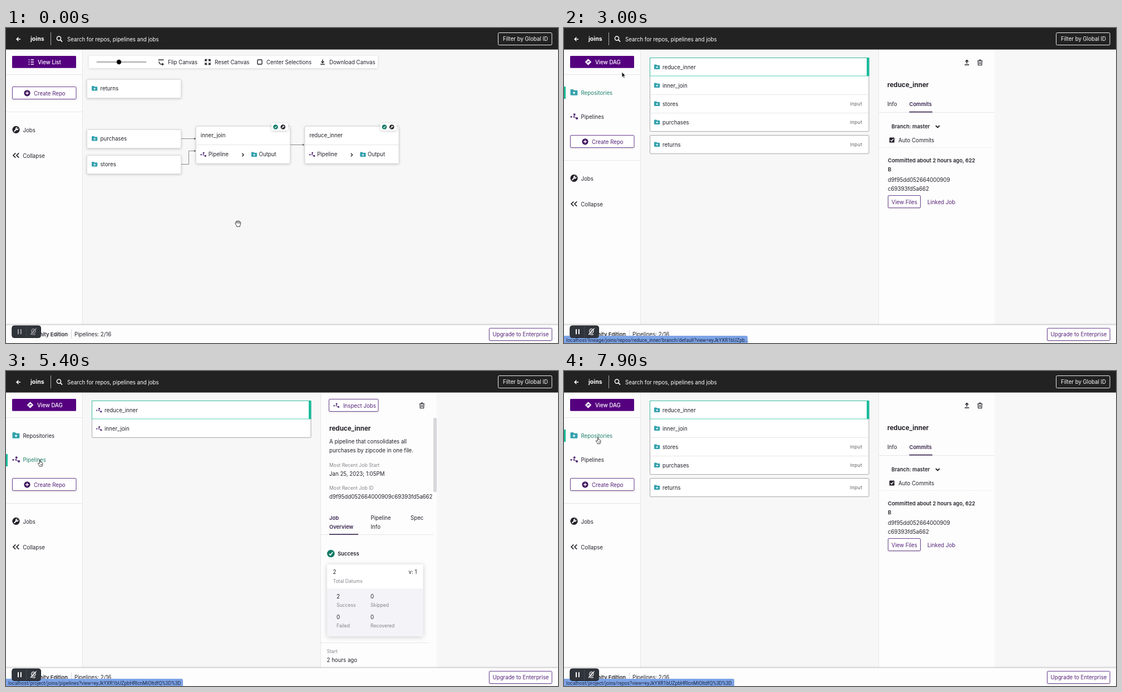
Recreate the animation shown at these times as an HTML page. Size 992 by 565 pixels, loop 8 s.

```html
<!DOCTYPE html>
<html lang="en">
<head>
<meta charset="utf-8">
<title>Joins project</title>
<style>
html, body { margin: 0; width: 100%; height: 100%; overflow: hidden; background: #f7f7f7; }
svg { display: block; width: 992px; height: 565px; }
text { font: 400 9.7px Inter, sans-serif; fill: #25212a; white-space: pre; }
.b { font-weight: 600; font-size: 9.4px; }
.h { font-weight: 700; font-size: 11.6px; }
.m { font-weight: 500; }
.w { fill: #fff; }
.p { fill: #552478; }
.g { fill: #85828a; font-size: 8.6px; }
.in { fill: #55525a; font-size: 8.2px; letter-spacing: .5px; }
.on { fill: #23806d; }
.tab { fill: #35204a; }
.url { font: 8.75px Roboto, sans-serif; fill: #1b2740; }
.btn { fill: #fff; stroke: #6c4390; filter: drop-shadow(0 1px 1.5px #0002); }
.card { fill: #fff; filter: drop-shadow(0 1px 2px #0003); }
.box { fill: #fff; stroke: #a9a8ad; }
.rule { stroke: #e6e5e9; fill: none; }
.ln { fill: none; stroke: #25212a; stroke-width: 1.4; }
.edge { fill: none; stroke: #8a878e; }
</style>
</head>
<body>
<svg id="stage" viewBox="0 0 992 565"></svg>
<script>
const PURPLE = '#55017f', TEAL = '#1abc9c', INK = '#25212a';

// Text is placed by its vertical centre.
const text = (x, y, s, c = '', more = '') => `<text x="${x}" y="${y + 3.5}" class="${c}" ${more}>${s}</text>`;
const rect = (x, y, w, h, more = '') => `<rect x="${x}" y="${y}" width="${w}" height="${h}" ${more}/>`;
const path = (d, more = 'class="ln"') => `<path d="${d}" ${more}/>`;
const dot = (x, y, r, fill = INK) => `<circle cx="${x}" cy="${y}" r="${r}" fill="${fill}"/>`;
const at = (x, y, s, k = 1) => `<g transform="translate(${x} ${y}) scale(${k})">${s}</g>`;
const group = (id, s) => `<g id="${id}">${s}</g>`;
const rule = d => path(d, 'class="rule"');
const button = (x, y, w) => rect(x, y, w, 22, 'rx="1.5" class="btn"');

const folder = (x, y, k = 1) => at(x, y,
  path('M0 1Q0 0 1 0H4L5.2 1.3H9.3Q10.3 1.3 10.3 2.3V7.6Q10.3 8.6 9.3 8.6H1Q0 8.6 0 7.6Z', 'fill="#35a2ae"') +
  path('M3.5 5H6.9M5.2 3.3V6.7', 'stroke="#fff" stroke-width="1.1"'), k);
const nodes = (x, y, k = 1) => at(x, y,
  path('M5.6 2.2L4.8 5.2L8.8 7.4', 'fill="none" stroke="#512a75" stroke-width=".8"') +
  dot(1.2, 5.2, 1.2, '#512a75') + dot(5.6, 2, 1.5, '#512a75') +
  dot(4.8, 5.4, .9, '#512a75') + dot(8.9, 7.4, 1.6, '#512a75'), k);
const wrench = (x, y, r) => at(x, y, dot(0, 0, 6.5) +
  path('M-2.8 2.8L1 -1', 'stroke="#fff" stroke-width="2" stroke-linecap="round"') +
  dot(1.6, -1.6, 2.6, '#fff') + path('M1.6 -1.6L4.4 -4.4', `stroke="${INK}" stroke-width="1.9"`), r / 6.5);
const check = (x, y, r) => at(x, y, dot(0, 0, 6.5, '#127a66') +
  path('M-2.8 .4L-.8 2.6L3 -2.4', 'fill="none" stroke="#fff" stroke-width="1.6"'), r / 6.5);
const trash = at(747.5, 62,
  path('M-4.6 -3H4.6M-1.6 -3V-4.6H1.6V-3M-3.6 -3L-3.2 4.7H3.2L3.6 -3M-1.2 -1V3M1.2 -1V3', 'class="ln" style="stroke-width:1.1"'));

const repoCard = (y, name, id = '') =>
  rect(145.5, y + .5, 169, 33, `rx="1.5" class="card" stroke="#dddce0" ${id}`) +
  folder(154, y + 12) + text(169.5, y + 16, name);

const pipeCard = (x, name) =>
  rect(x, 176.5, 169, 66.5, 'rx="1.5" class="card" stroke="#dddce0"') + rule(`M${x} 209.5h169`) +
  text(x + 8.2, 192, name) + nodes(x + 8, 222) + text(x + 22.2, 226.5, 'Pipeline') +
  path(`M${x + 82.8} 224.7l2.8 2.8l-2.8 2.8`) + folder(x + 99.3, 222.5) + text(x + 113, 226.5, 'Output') +
  rect(x + 135.5, 171, 30, 13, 'rx="2" class="card"') + check(x + 143, 177.5, 4.3) + wrench(x + 156.3, 177.5, 4.3);

const row = (y, name, icon, input) => icon(162, y - 4.6) + text(177, y, name) +
  (input ? text(514, y - .5, 'Input', 'in') : '');
const selected = rect(154.5, 53.5, 393, 32.5, `fill="none" stroke="${TEAL}" stroke-opacity=".75"`) +
  rect(544, 53, 4.5, 33, `fill="${TEAL}"`);
const panel = rect(566, 39, 208, 493, 'fill="#fdfdfd"') + rule('M565.5 39V532') + trash;

const sidebar = rect(0, 38, 137, 494, 'fill="#fdfdfd"') + rule('M137.5 39V532M0 83.5H137');
const lower = group('lower',
  button(11.5, 105.5, 114.5) + dot(38, 116.8, 5.6, '#42175f') +
  path('M35 116.8H41M38 113.8V119.8', 'stroke="#fff" stroke-width="1.4"') + text(50, 117, 'Create Repo', 'p') +
  rule('M0 150.5H137') + wrench(18, 182.3, 6.6) + text(30.5, 183, 'Jobs') +
  path('M17.2 224.3L13 228.5L17.2 232.7M23.2 224.3L19 228.5L23.2 232.7', 'class="ln" style="stroke-width:1.7"') +
  text(30.2, 229, 'Collapse'));

const dag = group('dag',
  path('M44.5 57H50M44.5 61H50M44.5 65H50M40.5 57H42.2M40.5 61H42.2M40.5 65H42.2', 'stroke="#fff" stroke-width="1.5"') +
  text(57, 61, 'View List', 'w m') +
  rect(149, 50, 519, 22, 'class="card" style="filter:drop-shadow(0 1px 2px #0002)"') +
  path('M164 61H251', 'stroke="#bdbcc0" stroke-width="3" stroke-linecap="round"') + dot(203, 61, 4.2, '#000') +
  path('M273.5 57.3H283.5M275 60Q275 65 279.5 65H282M280.6 63L282.8 65L280.6 67') + text(291, 61, 'Flip Canvas') +
  path('M358 60V56.5H361.5M358 56.5L361 59.5M363.5 56.5H367V60M367 56.5L364 59.5M358 62V65.5H361.5M358 65.5L361 62.5M367 62V65.5H363.5M367 65.5L364 62.5') +
  text(375, 61, 'Reset Canvas') + rect(452, 57, 8, 8, 'rx="1" class="ln"') + text(468, 61, 'Center Selections') +
  path('M569 56.5V62M566.5 60L569 62.6L571.5 60M565.2 65H572.8') + text(581, 61, 'Download Canvas') +
  path('M315 198.5H339M315 244.5H328.5V220.5H339M510 209.5H535', 'class="edge"') +
  path('M338 196.5L342 198.5L338 200.5ZM338 218.5L342 220.5L338 222.5ZM533 207.5L537 209.5L533 211.5Z', 'fill="#77747b"') +
  repoCard(92, 'returns', 'id="returns"') + repoCard(182, 'purchases') + repoCard(228, 'stores') +
  pipeCard(341.5, 'inner_join') + pipeCard(537, 'reduce_inner'));

const list = group('list',
  path('M43.5 55.2L49.2 61L43.5 66.8L37.8 61Z', 'fill="#fff"') +
  path('M41.8 63V60.5H45M43.8 58.8L45.5 60.5L43.8 62.2', `fill="none" stroke="${PURPLE}"`) +
  text(56, 61, 'View DAG', 'w m') +
  rect(0, 105, 3, 22, `id="mark" fill="${TEAL}"`) +
  folder(11.5, 110, 1.25) + text(30.5, 116, 'Repositories', '', 'id="navRepos"') +
  nodes(11.5, 152.5, 1.3) + text(30.5, 159.5, 'Pipelines', '', 'id="navPipes"'));

const repos = group('repos',
  rect(154.5, 53.5, 393.5, 132, 'rx="1.5" class="box"') + rule('M156 119.5H547M156 152.5H547') + selected +
  rect(154.5, 192.5, 393.5, 33, 'rx="1.5" class="box"') +
  row(70, 'reduce_inner', folder) + row(103, 'inner_join', folder) + row(136, 'stores', folder, 1) +
  row(169, 'purchases', folder, 1) + row(209, 'returns', folder, 1) +
  panel + path('M724 64V58.5M721.3 60.4L724 57.6L726.7 60.4M720 66H728', 'class="ln" style="stroke-width:1.5"') +
  text(581, 102.5, 'reduce_inner', 'h') + text(581, 136, 'Info') + text(620.5, 136, 'Commits', 'b tab') +
  rule('M566 151.5H774') + rect(620.5, 149.8, 41.5, 1.6, 'class="tab"') +
  text(588.5, 176.5, 'Branch: master', 'b') + path('M668 175L671.5 178.5L675 175', 'class="ln" style="stroke-width:1.8"') +
  rect(584.8, 196.6, 9, 9, 'rx="1.2" fill="#25212a"') + path('M586.8 201L588.7 203L592 199', 'fill="none" stroke="#fff" stroke-width="1.3"') +
  text(601, 201, 'Auto Commits') + path('M566 214.5H768', 'class="rule" stroke-dasharray="2 2"') +
  text(582, 237, 'Committed about 2 hours ago, 622', 'b') + text(582, 253, 'B', 'b') +
  text(582, 272.5, 'd9f95dd052664000909') + text(582, 288.5, 'c69393fd5a662') +
  button(582.5, 300.5, 58) + text(588.5, 312, 'View Files', 'p') + text(653, 312, 'Linked Job', 'p'));

const stat = (x, y, n, label) => text(x, y, n) + text(x, y + 15.2, label, 'g');
const pipes = group('pipes',
  rect(154.5, 53.5, 393.5, 66, 'rx="1.5" class="box"') + selected +
  row(70, 'reduce_inner', nodes) + row(103, 'inner_join', nodes) +
  panel + button(580.5, 50.5, 88.5) + nodes(588.5, 57) + text(606, 62, 'Inspect Jobs', 'p') +
  rect(768, 84, 6, 133, 'rx="1.5" fill="#d8d7db"') +
  text(581, 103.5, 'reduce_inner', 'h') + text(581, 126, 'A pipeline that consolidates all') +
  text(581, 142, 'purchases by zipcode in one file.') +
  text(581, 168, 'Most Recent Job Start', 'g') + text(581, 184, 'Jan 25, 2023; 1:05PM') +
  text(581, 209.5, 'Most Recent Job ID', 'g') + text(581, 225, 'd9f95dd052664000909c69393fd5a662') +
  text(581, 263, 'Job', 'b tab') + text(581, 279, 'Overview', 'b tab') +
  text(655.5, 263, 'Pipeline') + text(655.5, 279, 'Info') + text(727, 263, 'Spec') +
  rule('M566 293.5H768M566 487.5H760') + rect(581, 292.2, 52, 1.6, 'class="tab"') +
  check(583.8, 327.5, 6.8) + text(596, 327.5, 'Success', 'b') +
  rect(577, 347, 172.5, 129, 'class="card" style="filter:drop-shadow(0 1px 4px #0003)"') + rect(577, 390, 172.5, 86, 'fill="#f4f4f8"') +
  text(587.5, 360.5, '2') + text(587.5, 376.5, 'Total Datums', 'g') + text(738.5, 360.5, 'v: 1', '', 'text-anchor="end"') +
  stat(594, 404, 2, 'Success') + stat(655, 404, 0, 'Skipped') + stat(594, 441.5, 0, 'Failed') + stat(655, 441.5, 0, 'Recovered') +
  text(576.5, 502, 'Start', 'g') + text(576.5, 518, '2 hours ago'));

const header = rect(0, 0, 992, 38.6, 'fill="#222"') +
  path('M26 20H19.5M22.4 16.8L19.2 20L22.4 23.2', 'fill="none" stroke="#fff" stroke-width="1.6"') +
  text(44, 19.5, 'joins', 'h w', 'style="font-size:10.5px"') + path('M80.5 8V31', 'stroke="#aaa"') +
  '<circle cx="95" cy="18.6" r="3.6" fill="none" stroke="#fff" stroke-width="1.5"/>' +
  path('M97.6 21.2L101 24.6', 'stroke="#fff" stroke-width="1.7"') +
  text(110, 20, 'Search for repos, pipelines and jobs', 'w') +
  rect(884.5, 8.5, 96.5, 22, 'rx="2" fill="none" stroke="#eee"') + text(893, 19.8, 'Filter by Global ID', 'w');

const footer = rect(0, 532, 992, 33, 'fill="#fdfdfd" style="filter:drop-shadow(0 -1px 1px #0002)"') +
  path('M0 532.3H992', 'stroke="#d0cfd3"') +
  text(111, 549.3, 'Community Edition', 'b', 'text-anchor="end"') + path('M117.5 541V557', 'stroke="#d5d4d8"') +
  text(123, 549.3, 'Pipelines: 2/16') +
  button(868.5, 538.5, 112.5) + text(874.5, 549.5, 'Upgrade to Enterprise', 'p');

const status = group('status', path('M0 552H279Q282 552 282 555V565H0Z', 'id="tip" fill="#7da3e6"') + text(4, 559, '', 'url', 'id="url"'));
const widget = rect(10.8, 534, 51.7, 21.5, 'rx="4" fill="#30343b" stroke="#1f2227"') + path('M36.8 535V555', 'stroke="#474b53"') +
  group('controls', path('M22 540.2V549.2M26.8 540.2V549.2', 'stroke="#fff" stroke-width="2"') +
  path('M45 548.4Q49 551.2 53 549.4M54.6 538.6L44 550', 'fill="none" stroke="#fff" stroke-width="1.2"') +
  '<circle cx="49.3" cy="543.6" r="3.7" fill="none" stroke="#fff" stroke-width="1.2"/>' + dot(49.3, 543.6, 1.4, '#fff'));

const skin = 'fill="#fff" stroke="#222" stroke-width=".9" stroke-linejoin="round"';
const cursor = group('cursor',
  group('grab', path('M-4.8 .4Q-5.6 -1.4 -4.4 -1.8Q-3.8 -2 -3 -.8L-3.8 -3.2Q-3.8 -4.6 -2.8 -4.6Q-2 -4.6 -1.6 -3.2Q-1.4 -5.4 -.2 -5.4Q1 -5.4 1 -3.8Q1.6 -5 2.6 -4.6Q3.4 -4.2 3.2 -2.8Q4.8 -3.2 4.8 -1.6Q4.8 1 3.6 2.8L3.2 5.2H-2.2Q-2.6 3.2 -4.8 .4Z', skin) +
    path('M-1.5 -3.2L-1 -.4M1 -3.8V-.5M3.2 -2.8L2.8 -.2', skin)) +
  group('point', at(0, 0, path('M-.9 .8Q-.9 -.2 0 -.2T.9 .8V4.6Q1.6 4 2.4 4.9Q3.2 4.5 3.9 5.3Q5.4 5 5.4 6.6V8.6Q5.4 10.4 4.3 11.3V12.6H-1.1V11.6Q-3 9.6 -3.8 7.2Q-4 6.2 -3.2 6Q-2.2 6.3 -.9 7.6Z', skin) +
    path('M1 8.2V10.6M2.5 8.2V10.6M4 8.2V10.6', 'stroke="#222" stroke-width=".6"'), .92)) +
  group('arrow', path('M0 0V9.4L2.2 7.4L3.7 10.8L5.2 10.1L3.7 6.8H6.6Z', 'fill="#111" stroke="#fff" stroke-width=".7"')));

stage.innerHTML = sidebar + rect(11, 50, 115, 21.7, 'rx="1.5" id="view"') +
  lower + dag + list + repos + pipes + footer + header + status + widget + cursor;

const el = id => document.getElementById(id);
const show = (id, on) => { el(id).style.display = on ? '' : 'none'; };

// Cursor stops: time, x, y
const stops = [[0, 417, 351], [150, 417, 351], [1350, 146, 97], [1520, 146, 97], [1900, 110, 62], [2500, 110, 62],
  [2900, 104, 79], [3700, 104, 79], [4500, 61, 159.5], [5700, 61, 159.5], [6200, 61, 121], [6800, 61, 121], [7300, 61, 119], [8000, 61, 119]];
const token = 'eyJkYXR1bUZpbHRlcnMiOltdfQ%3D%3D';
// Link hints: start, end, bar width, address
const hints = [
  [1900, 2600, 282, 'localhost/project/joins?view=' + token],
  [2600, 3800, 330, 'localhost/lineage/joins/repos/reduce_inner/branch/default?view=eyJkYXR1bUZpb...'],
  [5100, 6000, 318, 'localhost/project/joins/pipelines?view=' + token],
  [6000, 8000, 306, 'localhost/project/joins/repos?view=' + token]];

function place(t) {
  const i = stops.findIndex(s => s[0] > t), [t0, x0, y0] = stops[i - 1], [t1, x1, y1] = stops[i];
  const u = (t - t0) / (t1 - t0), e = u * u * (3 - 2 * u);
  return [x0 + (x1 - x0) * e, y0 + (y1 - y0) * e];
}

function draw(t) {
  const scene = t < 2500 ? 'dag' : t >= 5400 && t < 7000 ? 'pipes' : 'repos', isDag = scene === 'dag';
  const [x, y] = place(t);
  const over = (l, top, r, b) => x >= l && x <= r && y >= top && y <= b;

  for (const id of ['dag', 'repos', 'pipes']) show(id, id === scene);
  show('list', !isDag);
  el('lower').setAttribute('transform', `translate(0 ${isDag ? 0 : 87})`);
  el('mark').setAttribute('y', scene === 'pipes' ? 149 : 105);

  const onView = over(11, 50, 126, 72), onCard = isDag && over(145, 92, 315, 126);
  const onRepos = !isDag && over(0, 105, 137, 127), onPipes = !isDag && over(0, 149, 137, 171);
  el('view').setAttribute('fill', onView ? '#9212c0' : PURPLE);
  el('view').style.filter = onView ? 'drop-shadow(0 1px 1.5px #0005)' : '';
  el('returns').setAttribute('stroke', onCard ? '#58c9b2' : '#dddce0');
  el('navRepos').setAttribute('class', scene === 'repos' || onRepos ? 'on' : '');
  el('navPipes').setAttribute('class', scene === 'pipes' || onPipes ? 'on' : '');

  const hint = hints.find(h => t >= h[0] && t < h[1]);
  show('status', hint);
  if (hint) {
    el('tip').setAttribute('d', `M0 552H${hint[2] - 3}q3 0 3 3V565H0Z`);
    el('url').textContent = hint[3];
  }
  el('controls').setAttribute('opacity', Math.min(1, .55 + Math.max(0, t - 100) / 600));

  const kind = onView || onCard || onRepos || onPipes ? 'point' : isDag && x > 138 && y > 39 ? 'grab' : 'arrow';
  for (const id of ['grab', 'point', 'arrow']) show(id, id === kind);
  el('cursor').setAttribute('transform', `translate(${x} ${y})`);
}

const start = performance.now();
function tick() {
  draw((performance.now() - start) % 8000);
  requestAnimationFrame(tick);
}
tick();
</script>
</body>
</html>
```
